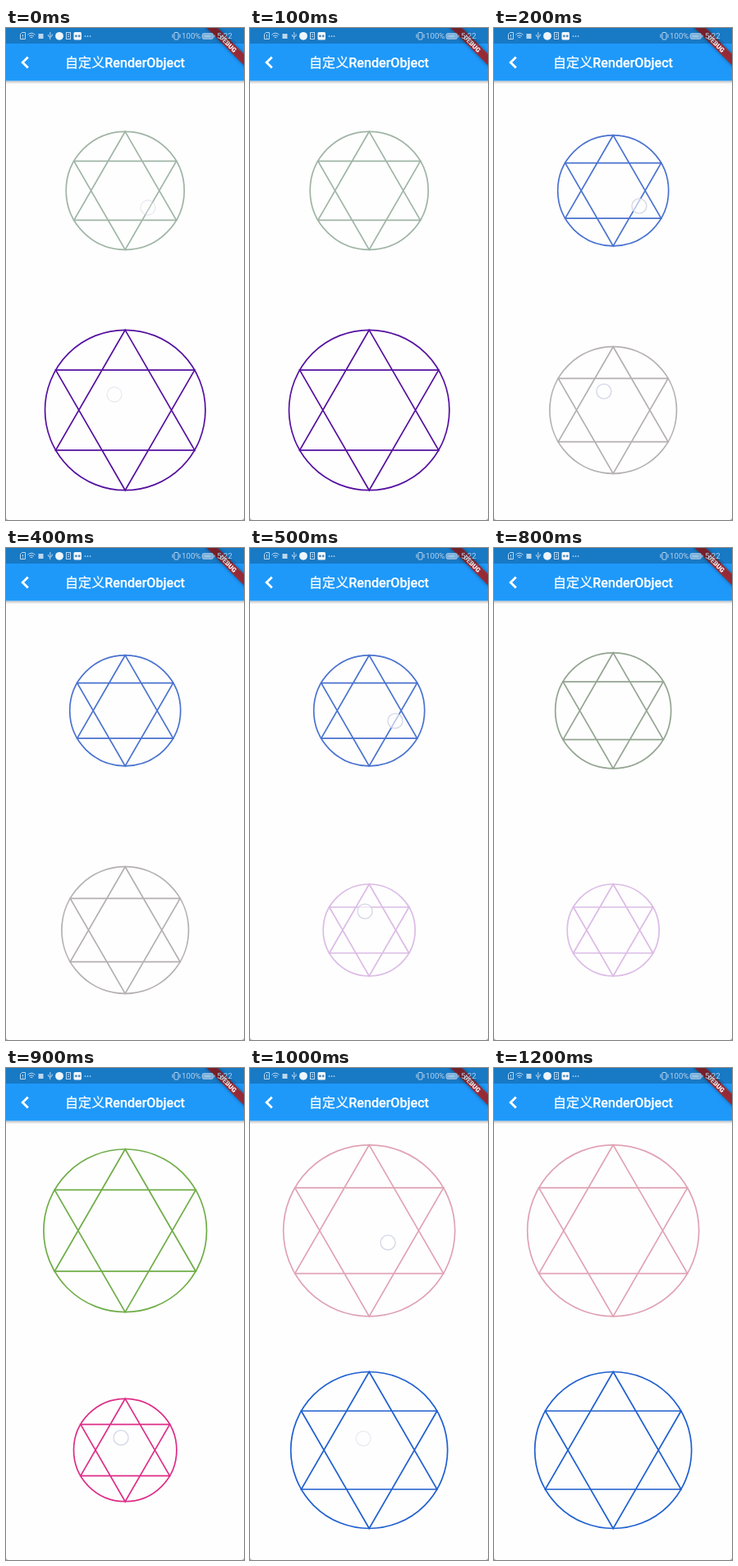
An HTML page that plays this animation: 290 px wide and 600 px high, repeating every 1400 ms.

```html
<!DOCTYPE html>
<html lang="zh">
<head>
<meta charset="utf-8">
<style>
  html, body { margin: 0; width: 100%; height: 100%; overflow: hidden; background: #fff; }
  svg { display: block; width: 290px; height: 600px; }
  text { font-family: Roboto, "Noto Sans CJK SC", "Noto Sans CJK", sans-serif; }
  .line { fill: none; stroke-width: 1.7; }
  .touch { fill: #fff; fill-opacity: .6; stroke: #d3d6e6; stroke-width: 1.3; }
</style>
</head>
<body>
<svg viewBox="0 0 290 600">
  <defs>
    <linearGradient id="shade" x2="0" y2="1">
      <stop stop-color="#000" stop-opacity=".24"/>
      <stop offset="1" stop-color="#000" stop-opacity="0"/>
    </linearGradient>
    <filter id="blur" x="-20%" y="-100%" width="140%" height="300%"><feGaussianBlur stdDeviation="2"/></filter>
  </defs>
  <rect width="290" height="600" fill="#b9b9bb"/>
  <rect width="290" height="600" rx="4" fill="#fefefe"/>
  <rect y="64.4" width="290" height="4" fill="url(#shade)"/>
  <rect width="290" height="64.4" fill="#1e99fa"/>

  <!-- title bar -->
  <path d="M26.8 35.4L20.2 42l6.6 6.6" fill="none" stroke="#fff" stroke-width="2.8"/>
  <text x="145" y="48.4" font-size="16.1" font-weight="500" text-anchor="middle" fill="#fff" stroke="#fff" stroke-width=".25">自定义RenderObject</text>

  <g transform="translate(290 0) rotate(45)">
    <rect x="-36" y="22.5" width="72" height="9.7" opacity=".4" filter="url(#blur)"/>
    <rect x="-36" y="22.5" width="72" height="9.7" fill="#b71c1c" fill-opacity=".8"/>
    <text y="30.2" font-size="8" font-weight="900" text-anchor="middle" fill="#fff">DEBUG</text>
  </g>

  <!-- status bar, translucent over everything below it -->
  <rect width="290" height="19" fill-opacity=".21"/>
  <g fill="none" stroke="#bcd8ef" stroke-width="1">
    <path d="M17.5 7.5l2-2h4v8h-6zM20.5 8v2.5M20.5 11.5v1"/>
    <path d="M26.5 8.2q4.5-4 9 0M28 10q3-2.5 6 0M29.6 11.8q1.4-1.2 2.8 0"/>
    <rect x="39.5" y="7" width="6" height="6" fill="#bcd8ef" stroke="none"/>
    <path d="M53.8 5v9M51.5 8v2l2.3 1.6M56.2 7.5v2l-2.4 1.5"/>
    <rect x="73.5" y="5.5" width="5" height="8"/>
    <path d="M75 8h2M75 10.5h2"/>
    <rect x="205" y="5.5" width="5" height="8.5" rx="1"/>
    <path d="M203 7.5v4.5M212 7.5v4.5"/>
    <rect x="239" y="6.5" width="13.5" height="7" rx="2" fill="#7fb2dc" stroke="#8ebbe0"/>
    <path d="M242 10h7M254 8.5v3"/>
  </g>
  <circle cx="65" cy="9.8" r="4.9" fill="#eef6fc"/>
  <rect x="82.5" y="5" width="9.5" height="9.5" rx="1.5" fill="#f2f8fd"/>
  <g fill="#5b8fbd"><circle cx="85.4" cy="9.8" r="1.5"/><circle cx="89.2" cy="9.8" r="1.5"/></g>
  <path d="M96.5 10h.01m2.99 0h.01m2.99 0h.01" stroke="#d0e4f4" stroke-width="1.7" stroke-linecap="round"/>
  <g font-size="9.7" fill="#b5d3ec"><text x="214" y="13.4">100%</text><text x="257" y="13.4">5:22</text></g>

  <g id="stars"></g>
</svg>
<script>
const STEP = 100, LOOP = 1400, CX = 145.2, FADE = 200, SWAY = 5;

// looks: [from, radius, colour]; the finger circles slowly around x, y
const stars = [
  { cy: 198.3, x: 173, y: 214, phase: Math.PI / 2, spin: -1, presses: [-100, 200, 500, 1000],
    looks: [[0, 72, '#a0b5a6'], [200, 67.5, '#4a72d0'], [700, 70.5, '#93a591'], [900, 99.3, '#70ad48'], [1000, 104.5, '#e0a3b5']] },
  { cy: 466, x: 137, y: 447, phase: Math.PI, spin: 1, presses: [-100, 200, 500, 900],
    looks: [[0, 97.7, '#5510a0'], [200, 77.3, '#b5b0b2'], [500, 56, '#dcbce6'], [900, 62.7, '#dd2e88'], [1000, 95.5, '#2060d0']] }
];

function add(tag, cls) {
  const el = document.createElementNS('http://www.w3.org/2000/svg', tag);
  el.setAttribute('class', cls);
  return document.getElementById('stars').appendChild(el);
}

function set(el, attrs) {
  for (const key in attrs) el.setAttribute(key, attrs[key]);
}

function triangle(cy, r, turn) {
  const points = [0, 1, 2].map(i => {
    const a = turn + i * Math.PI * 2 / 3;
    return `${CX + r * Math.sin(a)} ${cy - r * Math.cos(a)}`;
  });
  return `M${points.join('L')}Z`;
}

for (const star of stars) {
  star.ring = add('circle', 'line');
  star.path = add('path', 'line');
  star.touch = add('circle', 'touch');
}

function draw(now) {
  const t = Math.floor(now % LOOP / STEP) * STEP;
  for (const { cy, x, y, phase, spin, presses, looks, ring, path, touch } of stars) {
    const [, r, stroke] = looks.filter(look => look[0] <= t).pop();
    set(ring, { cx: CX, cy, r, stroke });
    set(path, { d: triangle(cy, r, 0) + triangle(cy, r, Math.PI), stroke });

    const age = t - presses.filter(press => press <= t).pop();
    const a = phase + spin * t / LOOP * Math.PI * 2;
    set(touch, {
      cx: x + SWAY * Math.cos(a), cy: y + SWAY * Math.sin(a), r: 9,
      opacity: Math.max(0, 1 - age / FADE)
    });
  }
}

const start = performance.now();
function tick() {
  draw(performance.now() - start);
  requestAnimationFrame(tick);
}
tick();
</script>
</body>
</html>
```
